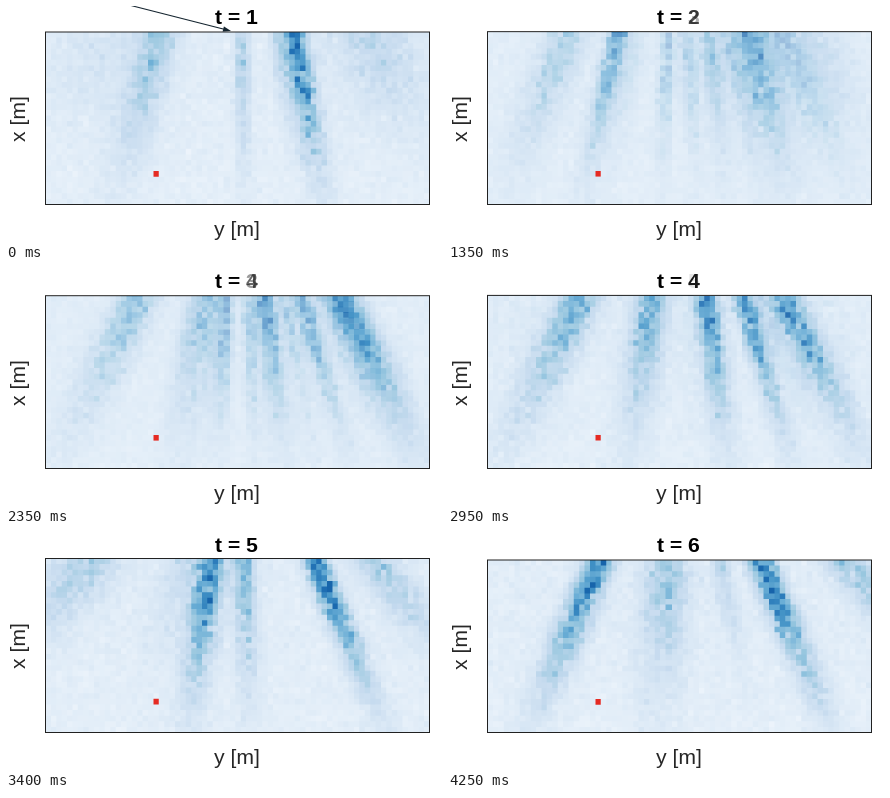
Write a matplotlib script that moves like this. It is 436 px wide and 236 px high and loops after 6250 ms.

```python
import numpy as np
import matplotlib.pyplot as plt
from matplotlib.animation import FuncAnimation

W, H, DPI = 436, 236, 100
STEP, FRAMES = 50, 125          # ms per frame, frames per loop
HOLD, FADE = 8, 10              # frames a field stays, frames a cross-fade takes
COLS, ROWS, SS = 71, 31, 4      # grid cells and supersampling
LEFT, RIGHT, BOTTOM = 39.5, 422.5, 198.5
MID = 231
INK = "#262626"
EM = 21.2                       # font size in pixels
FONT = dict(family="Liberation Sans", fontsize=EM * 72 / DPI, color=INK)

# Top edge of the box, outward fan, streaks (x at top, width, strength)
FIELDS = [
    (26, .55, [(153, 13, .27), (235, 4.5, .26), (286, 8, .58),
               (360, 28, .17), (105, 32, .07), (269, 5, .14)]),
    (25.5, .62, [(122, 14, .27), (171, 7, .52), (260, 7, .28),
                 (235, 4, .15), (298, 13, .5), (362, 18, .15)]),
    (26, .75, [(190, 7, .25), (220, 5, .55), (241, 4.5, .46),
               (259, 4, .18), (277, 5, .38), (331, 14, .58)]),
    (25.5, .85, [(133, 14, .38), (204, 11, .33), (257, 8, .5),
                 (293, 7, .5), (333, 12, .5)]),
    (24.5, .95, [(86, 24, .21), (206, 9, .55), (180, 14, .12),
                 (237, 7, .32), (307, 8, .6), (365, 15, .24)]),
    (26, .9, [(152, 10, .55), (219, 14, .26), (270, 6, .18),
              (311, 9, .58), (395, 17, .24)]),
]


def grid(fan, streaks, rng):
    x = LEFT + (np.arange(COLS) + .5) * (RIGHT - LEFT) / COLS
    d = ((np.arange(ROWS) + .5) / ROWS)[:, None]
    v = np.zeros((ROWS, COLS))
    for x0, width, amp in streaks:
        mid = x0 + fan * (x0 - MID) * d
        wid = width * (1 + .4 * d)
        reach = .66 if amp > .24 else .45
        v += amp * np.exp(-(d / reach) ** 2 - .5 * ((x - mid) / wid) ** 2)
    v = v * rng.gamma(20, 1 / 20, v.shape)
    v += .095 + rng.normal(0, .014, v.shape) + .03 * (1 - d) * rng.random(v.shape)
    rgb = plt.cm.Blues(np.clip(v, .05, .8))[..., :3]
    rgb[25, 20] = .9, .17, .14
    return rgb


def picture(top, fan, streaks, rng):
    """Antialiased stage image of one field with its box."""
    x = (np.arange(W * SS) + .5) / SS
    y = (np.arange(H * SS) + .5) / SS
    col = np.floor((x - LEFT) / (RIGHT - LEFT) * COLS).astype(int).clip(0, COLS - 1)
    row = np.floor((y - top) / (BOTTOM - top) * ROWS).astype(int).clip(0, ROWS - 1)
    img = grid(fan, streaks, rng)[row][:, col]

    def inside(pad):
        return (((y > top - pad) & (y < BOTTOM + pad))[:, None]
                & ((x > LEFT - pad) & (x < RIGHT + pad)))

    img[~inside(-.5)] = .13
    img[~inside(.5)] = 1
    return img.reshape(H, SS, W, SS, 3).mean(axis=(1, 3))


rng = np.random.default_rng(7)
pics = [picture(*field, rng) for field in FIELDS]
tops = [field[0] for field in FIELDS]
LAST = len(FIELDS) - 1

fig = plt.figure(figsize=(W / DPI, H / DPI), dpi=DPI, facecolor="white")
ax = fig.add_axes([0, 0, 1, 1])
image = ax.imshow(pics[0], extent=(0, W, H, 0), interpolation="nearest", aspect="auto")
ax.set(xlim=(0, W), ylim=(H, 0))
ax.axis("off")

title = {**FONT, "weight": "bold", "color": "black"}
ax.text(208.5, 18, "t =", **title)
digits = [ax.text(208.5 + 1.473 * EM, 18, str(i + 1), **title)
          for i in range(len(FIELDS))]
ax.text(MID, 230, "y [m]", ha="center", **FONT)
xlabel = ax.text(14.5, 112, "x [m]", rotation=90, ha="center", va="center", **FONT)

tip, tail = np.array([225, 25]), np.array([123, -1])
along = (tip - tail) / np.hypot(*(tip - tail))
side = 2.7 * np.array([-along[1], along[0]])
base = tip - 8 * along
arrow = [
    ax.plot(*zip(tail, base), color="#14242f", lw=.75)[0],
    ax.fill(*zip(tip, base + side, base - side), color="#14242f", lw=0)[0],
]


def update(n):
    k, r = divmod(n, HOLD + FADE - 1)
    mix = max(0, r - HOLD + 1) / FADE
    if k >= LAST:
        k, mix = LAST, 0
    nxt = min(k + 1, LAST)
    image.set_data((1 - mix) * pics[k] + mix * pics[nxt])
    for i, digit in enumerate(digits):
        digit.set_alpha(1 - mix if i == k else mix if i == nxt else 0)
    for part in arrow:
        part.set_alpha(1 - mix if k == 0 else 0)
    top = (1 - mix) * tops[k] + mix * tops[nxt]
    xlabel.set_y((top + BOTTOM) / 2)
    return [image, xlabel, *digits, *arrow]


anim = FuncAnimation(fig, update, frames=FRAMES, interval=STEP, repeat=True,
                     repeat_delay=0, blit=False)
plt.show()
```
